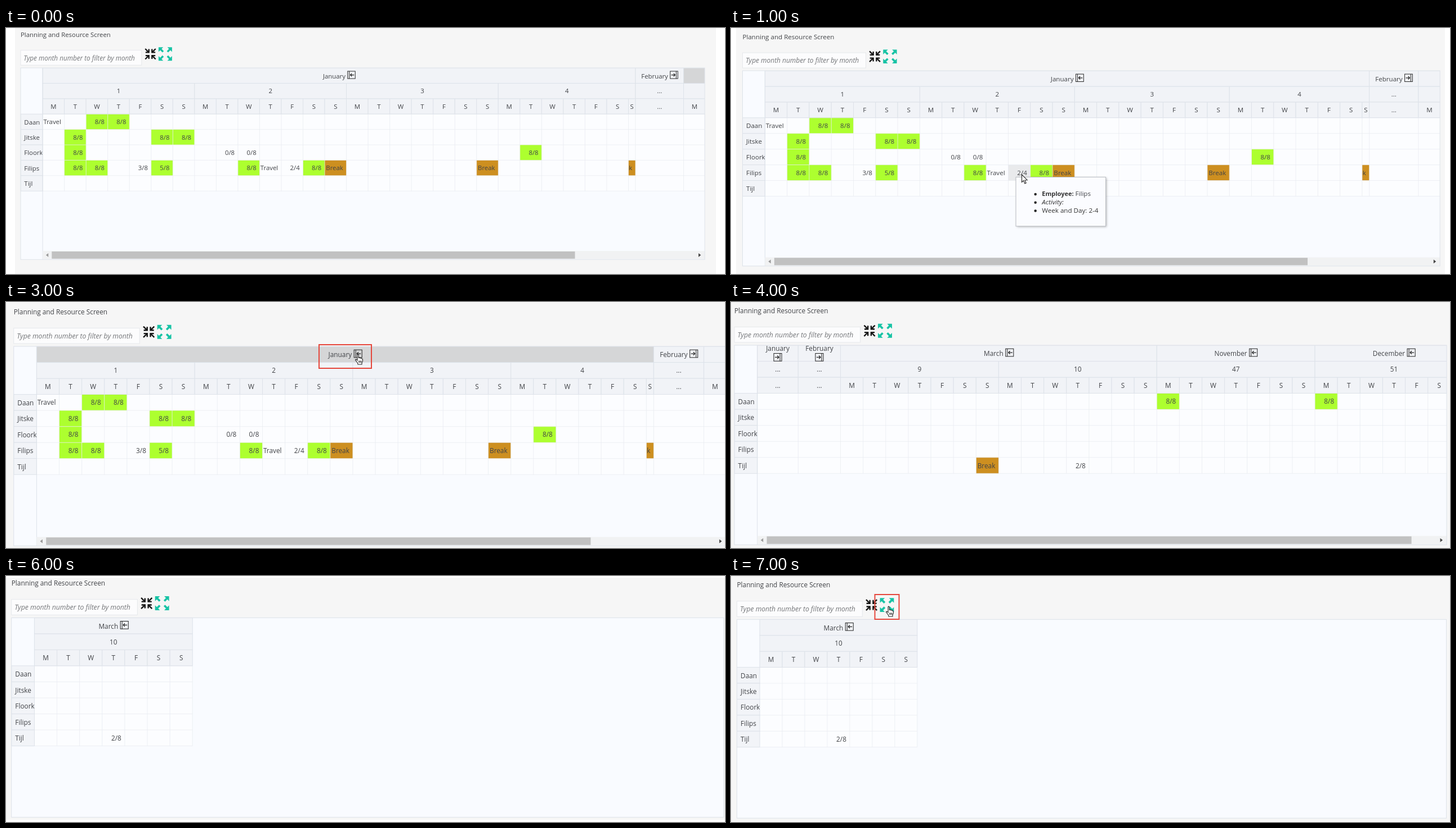
An HTML page with a canvas that plays this animation: 1277 px wide and 438 px high, repeating every 8 s.

```html
<!DOCTYPE html>
<html lang="en">
<head>
<meta charset="utf-8">
<title>Planning and Resource Screen</title>
<style>
  html, body { margin: 0; width: 100%; height: 100%; overflow: hidden; background: #fff; }
  canvas { display: block; }
</style>
</head>
<body>
<canvas id="stage" width="1277" height="438"></canvas>
<script>
const ctx = document.getElementById('stage').getContext('2d');
const SANS = '"Open Sans", "Noto Sans", sans-serif';
const FONT = `11.8px ${SANS}`, BOLD = `bold 11.2px ${SANS}`, ITALIC = `italic 11.8px ${SANS}`;
const INK = '#414347', LINE = '#dde2e9', HOVER = '#d5d6d7';
const NAMES = ['Daan', 'Jitske', 'Floorke', 'Filips', 'Tijl'];

// Table sizes in unscaled units
const DAY = 40, ROW = 28.45, SIDE = 40.6, WIDTH = 1261.3, HEIGHT = 354.2;
const HEAD = 3 * ROW, BODY_END = 8 * ROW;

// Month: [name, week numbers] when open, [name, width] when collapsed.
// Cells: "row column text".
const year = {
  months: [['January', [1, 2, 3, 4]], ['February', 88.8], ['', ['']]],
  shortDay: 27,
  thumbEnd: 1022,
  cells: ['0 0 Travel', '0 2 8/8', '0 3 8/8', '1 1 8/8', '1 5 8/8', '1 6 8/8',
    '2 1 8/8', '2 8 0/8', '2 9 0/8', '2 22 8/8',
    '3 1 8/8', '3 2 8/8', '3 4 3/8', '3 5 5/8', '3 9 8/8', '3 10 Travel',
    '3 11 2/4', '3 12 8/8', '3 13 Break', '3 20 Break', '3 27 Break']
};
const collapsed = {
  months: [['January', 72.4], ['February', 75], ['March', [9, 10]], ['November', [47]], ['December', [51]]],
  thumbEnd: 1199,
  cells: ['0 16 8/8', '0 23 8/8', '4 8 Break', '4 12 2/8']
};
const week = { months: [['March', [10]]], cells: ['4 3 2/8'] };

// One scene per second; back is the page area, the rest is in stage pixels
const scenes = [
  { view: year, x: 26, y: 71, s: .9633, back: [16, 0, 1261, 438], hover: 'h0' },
  { view: year, x: 20.5, y: 76, s: .982, back: [9, 0, 1268, 438], hover: '3 11',
    tip: { x: 506, y: 265.5, w: 162.5, activity: '', day: '2-4' }, arrow: [516.5, 261] },
  { view: year, x: 9.7, y: 77, s: 1.001, back: [0, 2, 1277, 436], hover: '3 10',
    tip: { x: 451, y: 270, w: 182, activity: ' activity: Travel', day: '2-3' }, arrow: [467, 263] },
  { view: year, x: 13.7, y: 79, s: 1.0027, back: [0, 1, 1277, 438], hover: 'h0January',
    frame: [556, 76, 93, 42], hand: [620, 93] },
  { view: collapsed, x: 6, y: 77, s: 1.003, back: [0, 0, 1277, 438] },
  { view: collapsed, x: 9.7, y: 74.3, s: 1.003, back: [0, 3, 1277, 434], hover: 'h110',
    frame: [595, 101.5, 49.5, 38.5], arrow: [621, 118] },
  { view: week, x: 9.7, y: 74.3, s: 1.003, back: [0, 3, 1277, 434] },
  { view: week, x: 10.5, y: 77.3, s: .999, back: [0, 0, 1277, 436.5],
    frame: [255.5, 33, 43, 44], hand: [275, 54] }
];

function rect(x, y, w, h, fill, stroke) {
  if (fill) { ctx.fillStyle = fill; ctx.fillRect(x, y, w, h); }
  if (stroke) { ctx.strokeStyle = stroke; ctx.lineWidth = 1; ctx.strokeRect(x, y, w, h); }
}

// y is the middle of the capitals
function text(str, x, y, align = 'left', font = FONT, color = INK) {
  ctx.font = font;
  ctx.textAlign = align;
  ctx.fillStyle = color;
  ctx.fillText(str, x, y + 4.2);
  return ctx.measureText(str).width;
}

function line(...p) {
  ctx.beginPath();
  for (let i = 0; i < p.length; i += 2) ctx.lineTo(p[i], p[i + 1]);
  ctx.stroke();
}

function polygon(fill, ...p) {
  ctx.beginPath();
  for (let i = 0; i < p.length; i += 2) ctx.lineTo(p[i], p[i + 1]);
  ctx.closePath();
  ctx.fillStyle = fill;
  ctx.fill();
}

function at(x, y, draw, sx = 1, sy = 1) {
  ctx.save();
  ctx.translate(x, y);
  ctx.scale(sx, sy);
  draw();
  ctx.restore();
}

function clipped(x, y, w, h, draw) {
  ctx.save();
  ctx.beginPath();
  ctx.rect(x, y, w, h);
  ctx.clip();
  draw();
  ctx.restore();
}

function corners(x, y, draw) {
  for (const sx of [-1, 1]) for (const sy of [-1, 1]) at(x, y, draw, sx, sy);
}

function toggleIcon(x, y, open) {
  at(x, y, () => {
    rect(-7, -6.8, 14, 13.6, null, '#222');
    line(-4, -6.8, -4, 6.8);
    ctx.lineWidth = 1.3;
    line(5, 0, -2, 0);
    line(.8, -2.8, -2, 0, .8, 2.8);
  }, open ? 1 : -1);
}

function toolbar() {
  text('Planning and Resource Screen', 0, -61.4);
  rect(0, -32.5, 223, 27.5, '#fcfcfd', '#e6e8eb');
  text('Type month number to filter by month', 5.5, -18.2, 'left', `italic 12.2px ${SANS}`, '#75777a');
  corners(239.3, -25.7, () => {
    ctx.strokeStyle = '#151515';
    ctx.lineWidth = 2.4;
    line(9.6, 9.6, 3, 3);
    line(2.9, 9, 2.9, 2.9, 9, 2.9);
  });
  corners(266.7, -25.7, () => {
    ctx.strokeStyle = '#17c3a5';
    ctx.lineWidth = 3.6;
    line(4, 4, 9.5, 9.5);
    polygon('#17c3a5', 12.4, 12.4, 12.4, 3.8, 3.8, 12.4);
  });
}

function headCell(scene, row, x, w, label) {
  rect(x, row * ROW, w, ROW, scene.hover === `h${row}${label}` ? HOVER : '#f1f3f7', LINE);
  if (row) text(label, x + w / 2, (row + .5) * ROW + .3, 'center');
}

function monthCell(scene, x, w, name, open) {
  headCell(scene, 0, x, w, name);
  if (!name) return;
  const mid = x + w / 2;
  if (w < 80) {
    text(name, mid, 6, 'center');
    toggleIcon(mid, 21.3, open);
  } else {
    const half = text(name, mid - 9, 15.2, 'center') / 2;
    toggleIcon(mid - 9 + half + 11, 13, open);
  }
}

// Draws the headers and returns the day columns as [x, width]
function header(scene) {
  const columns = [];
  let x = SIDE;
  for (const [name, weeks] of scene.view.months) {
    const start = x, open = Array.isArray(weeks);
    if (!open) {
      headCell(scene, 1, x, weeks, '...');
      headCell(scene, 2, x, weeks, '...');
      columns.push([x, weeks]);
      x += weeks;
    } else for (const number of weeks) {
      const weekStart = x;
      for (const day of 'MTWTFSS') {
        const w = columns.length === scene.view.shortDay ? 13 : DAY;
        headCell(scene, 2, x, w, day);
        columns.push([x, w]);
        x += w;
      }
      headCell(scene, 1, weekStart, x - weekStart, number);
    }
    monthCell(scene, start, x - start, name, open);
  }
  return columns;
}

function cell(scene, key, columns) {
  const [row, col, label] = key.split(' ');
  const [x, w] = columns[col], y = HEAD + row * ROW;
  const hovered = scene.hover === `${row} ${col}`;
  const fill = hovered ? '#e9eaec' : label === 'Break' ? '#cd8f20' : /^[58]/.test(label) ? '#adff2f' : null;
  rect(x, y, w, ROW, fill);
  clipped(x, y, w, ROW, () => text(label, x + w - 6, y + ROW / 2 + .3, 'right'));
}

function scrollbar(end) {
  rect(SIDE, 338.5, WIDTH - SIDE, 15, '#f1f2f3');
  rect(SIDE + 16.8, 339.3, end - SIDE - 16.8, 13.4, '#c1c1c1');
  polygon('#9a9a9a', SIDE + 6, 346, SIDE + 10.5, 342.5, SIDE + 10.5, 349.5);
  polygon('#444', WIDTH - 7, 346, WIDTH - 11.5, 342.5, WIDTH - 11.5, 349.5);
}

function table(scene) {
  const { view } = scene;
  rect(0, 0, WIDTH, HEIGHT, '#f9fbff');
  clipped(0, 0, WIDTH, HEIGHT, () => {
    const columns = header(scene);
    const [lastX, lastW] = columns[columns.length - 1], right = lastX + lastW;
    rect(SIDE, HEAD, right - SIDE, BODY_END - HEAD, '#fcfdff');
    for (const key of view.cells) cell(scene, key, columns);
    ctx.strokeStyle = 'rgba(232,235,240,.75)';
    for (const [x, w] of columns) line(x + w, HEAD, x + w, BODY_END);
    NAMES.forEach((name, i) => {
      const y = HEAD + i * ROW;
      ctx.strokeStyle = 'rgba(232,235,240,.75)';
      line(SIDE, y + ROW, right, y + ROW);
      rect(0, y, SIDE, ROW, '#f2f4f8', LINE);
      clipped(0, y, SIDE - .5, ROW, () => text(name, 6.6, y + ROW / 2 + .6));
    });
    ctx.strokeStyle = LINE;
    line(SIDE, HEAD, right, HEAD);
    if (view.thumbEnd) {
      line(SIDE, 0, SIDE, HEIGHT);
      scrollbar(view.thumbEnd);
    }
  });
  rect(0, 0, WIDTH, HEIGHT, null, LINE);
}

function tooltip({ w, activity, day }) {
  ctx.shadowColor = 'rgba(0,0,0,.3)';
  ctx.shadowBlur = 4;
  ctx.shadowOffsetX = ctx.shadowOffsetY = 1.5;
  rect(0, 0, w, 89, '#fbfcff');
  ctx.shadowColor = 'transparent';
  rect(0, 0, w, 89, null, '#b9bcc1');
  const rows = [['Employee:', BOLD, ' ' + NAMES[3]], ['Activity:', ITALIC, activity], ['Week and Day: ' + day, FONT, '']];
  rows.forEach(([label, font, value], i) => {
    const y = 30.2 + i * 15;
    ctx.fillStyle = '#222';
    ctx.beginPath();
    ctx.arc(35.3, y + .8, 2.3, 0, 7);
    ctx.fill();
    const end = text(label, 47.2, y, 'left', font, '#333');
    text(value, 47.2 + end, y);
  });
}

function pointer(...shape) {
  polygon('#fff', ...shape);
  ctx.strokeStyle = '#222';
  ctx.lineWidth = 1.1;
  ctx.stroke();
}

function arrow() {
  pointer(0, 0, 0, 13.5, 3.1, 10.7, 5.4, 16, 7.6, 15, 5.4, 9.9, 9.6, 9.7);
}

function hand() {
  pointer(4, 1, 5, 0, 6.2, 1, 6.2, 6.3, 8.2, 6, 9, 7, 11, 6.8, 11.7, 8, 13.2, 8.2, 13.5, 12,
    12, 15.5, 12, 18, 5, 18, 4.5, 15.5, .5, 10.5, 1, 9.2, 2.4, 9.4, 4, 11);
  for (const x of [6.8, 8.8, 10.8]) line(x, 11.5, x, 15);
}

function draw(scene) {
  const { x, y, s, back: [l, t, r, b], tip, frame } = scene;
  rect(0, 0, 1277, 438, '#fff');
  rect(l, t, r - l, b - t, '#f6f6f6');
  at(x, y, () => { toolbar(); table(scene); }, s, s);
  if (tip) at(tip.x, tip.y, () => tooltip(tip), s, s);
  if (frame) {
    ctx.strokeStyle = '#e5473c';
    ctx.lineWidth = 2;
    ctx.strokeRect(...frame);
  }
  if (scene.arrow) at(...scene.arrow, arrow);
  if (scene.hand) at(...scene.hand, hand);
}

function tick() {
  draw(scenes[Math.floor(performance.now() / 1000) % scenes.length]);
  requestAnimationFrame(tick);
}
tick();
</script>
</body>
</html>
```
